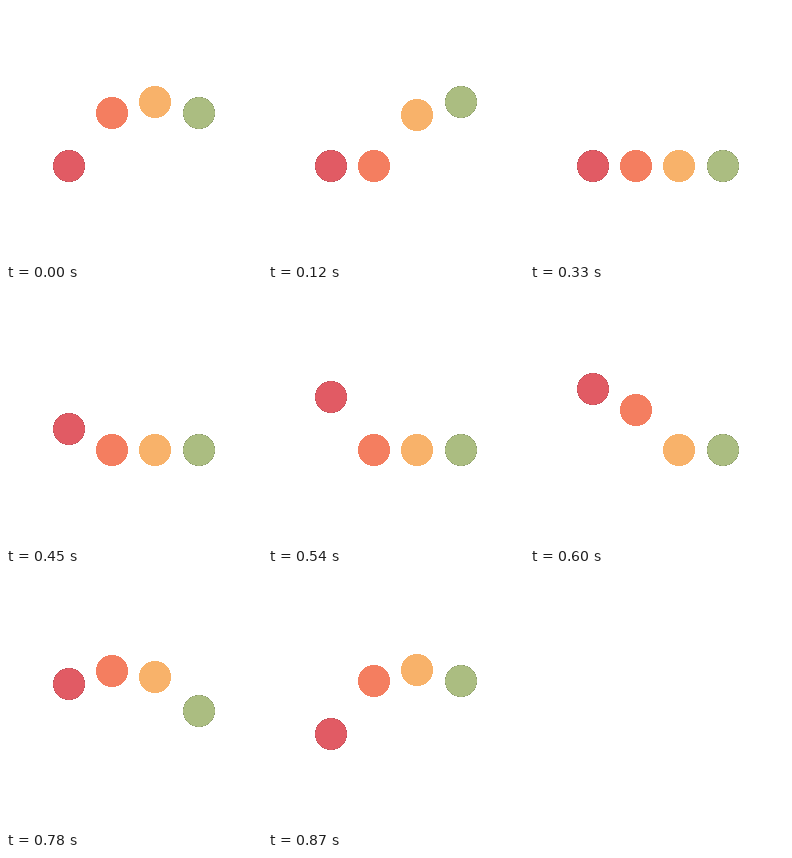
Recreate the animation shown at these times as an HTML page with a canvas. Size 256 by 256 pixels, loop 900 ms.

```html
<!DOCTYPE html>
<html lang="en">
<head>
<meta charset="utf-8">
<title>Bouncing dots</title>
<style>
  html, body { margin: 0; width: 100%; height: 100%; overflow: hidden; background: #fff; }
  canvas { display: block; }
</style>
</head>
<body>
<canvas id="stage" width="256" height="256"></canvas>
<script>
const ctx = document.getElementById('stage').getContext('2d');
const SIZE = 256, LOOP = 900, STEP = 30;
const LAST_STEP = LOOP / STEP - 1; // the last step repeats the first pose
const RADIUS = 16, INNER_RADIUS = 15.6;
const FLOOR_Y = 160.27, HEIGHT = 64;
const FIRST_X = 62.6, GAP = 43.4;
const DOTS = [
  { fill: '#e15b64', rim: '#b9525a' },
  { fill: '#f47e60', rim: '#f47e60' },
  { fill: '#f8b26a', rim: '#f8b26a' },
  { fill: '#abbd81', rim: '#8c9a6c' },
];

// cubic-bezier(0, 0.5, 0.5, 1)
function easeOut(x) {
  let low = 0, high = 1;
  for (let i = 0; i < 24; i++) {
    const p = (low + high) / 2;
    if (1.5 * p * p - 0.5 * p ** 3 < x) low = p;
    else high = p;
  }
  const p = (low + high) / 2, q = 1 - p;
  return 1.5 * q * q * p + 3 * q * p * p + p ** 3;
}

// Up in the first quarter, mirrored down in the second, then at rest.
function lift(phase) {
  return phase >= 0.5 ? 0 : easeOut(1 - Math.abs(phase - 0.25) / 0.25);
}

// A disc with hard pixel edges, filled row by row.
function disc(x, y, radius, color) {
  ctx.fillStyle = color;
  for (let row = -RADIUS; row < RADIUS; row++) {
    const half = Math.round(Math.sqrt(Math.max(0, radius ** 2 - (row + 0.5) ** 2)));
    ctx.fillRect(x - half, y + row, 2 * half, 1);
  }
}

function draw(time) {
  const progress = Math.floor((time % LOOP) / STEP) / LAST_STEP;
  ctx.fillStyle = '#fff';
  ctx.fillRect(0, 0, SIZE, SIZE);
  DOTS.forEach(({ fill, rim }, i) => {
    const phase = (progress + 0.5 - i * 0.125) % 1;
    const x = Math.round(FIRST_X + i * GAP);
    const y = Math.round(FLOOR_Y - HEIGHT * lift(phase));
    disc(x, y, RADIUS, rim);
    disc(x, y, INNER_RADIUS, fill);
  });
}

const start = performance.now();
function tick() {
  draw(performance.now() - start);
  requestAnimationFrame(tick);
}
tick();
</script>
</body>
</html>
```
